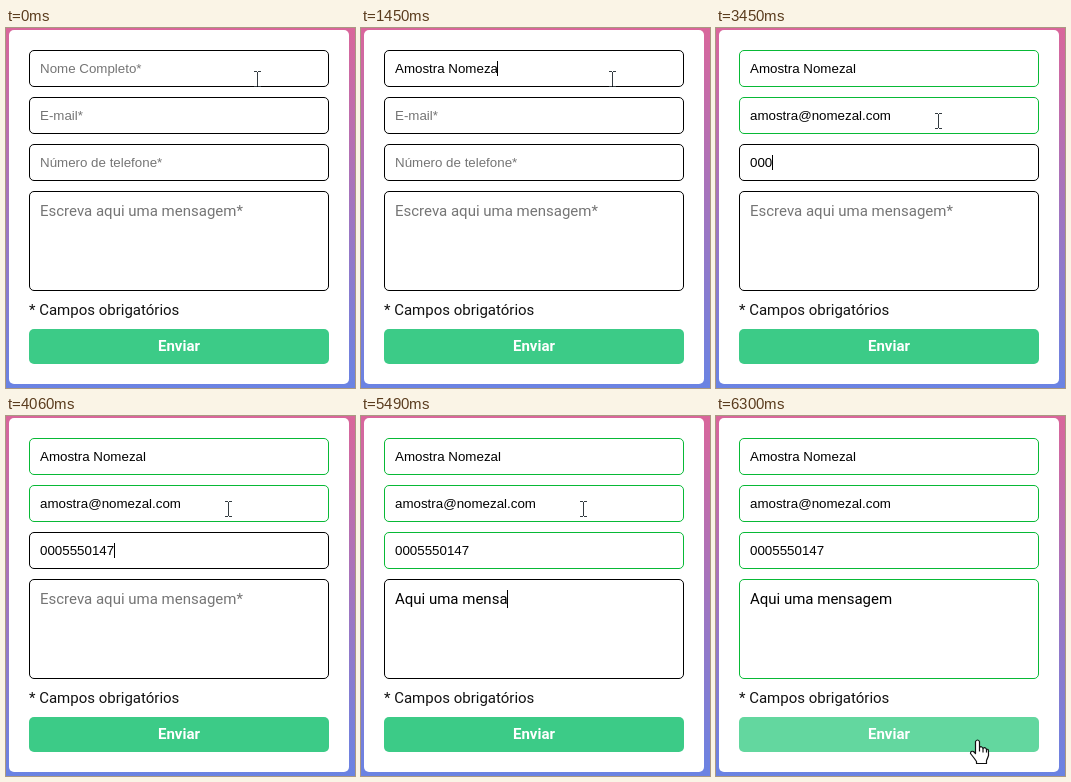
These frames come from a looping animation (349x360 px, 6430 ms). An HTML page:

```html
<!DOCTYPE html>
<html lang="pt">
<head>
<meta charset="utf-8">
<style>
html, body { margin: 0; width: 100%; height: 100%; overflow: hidden; }
svg { display: block; }
text { white-space: pre; font: 13.333px "Liberation Sans", Arial, sans-serif; }
.roboto { font: 15px Roboto, sans-serif; }
.bold { font-weight: 700; text-anchor: middle; }
</style>
</head>
<body>
<svg id="stage" width="349" height="360" viewBox="0 0 349 360">
  <defs>
    <linearGradient id="sky" x2="0" y2="1">
      <stop stop-color="#d9669b"/>
      <stop offset="1" stop-color="#6a83e3"/>
    </linearGradient>
  </defs>
  <rect width="349" height="360" fill="url(#sky)"/>
  <rect x="3" y="2" width="340" height="354" rx="5" fill="#fff"/>
  <g id="fields"></g>
  <text class="roboto" x="23" y="287" fill="#111">* Campos obrigatórios</text>
  <rect id="button" x="23" y="301" width="300" height="35" rx="5"/>
  <text class="roboto bold" x="173" y="323" fill="#fff">Enviar</text>
  <rect id="caret" width="1" fill="#000"/>
  <g id="beam" fill="none">
    <path d="M-3 -7.5H0M1 -7.5H4M.5 -7V7M-3 7.5H0M1 7.5H4" stroke="#fff" stroke-width="3"/>
    <path d="M-3 -7.5H0M1 -7.5H4M.5 -7V7M-3 7.5H0M1 7.5H4" stroke="#333b40"/>
  </g>
  <path id="hand" fill="#fff" stroke="#111" stroke-width="1.2" stroke-linejoin="round"
    d="M-2 1Q0 -2 2 1V7Q4 5 5.500 8Q8 6 9 9Q11 8 11 11V15Q10 18 9 20V23H-1V21Q-3 18 -7 13Q-7 10 -4 11L-2 13ZM2 7V11M5.500 8V12M9 9V12"/>
</svg>
<script>
const LOOP = 6430;
const $ = id => document.getElementById(id);
const run = (start, step, n) => Array.from({ length: n }, (_, i) => start + step * i);

// keys: the moment each character appears
const fields = [
  { y: 22, h: 37, hint: 'Nome Completo*', value: 'Amostra Nomezal', start: 0, end: 1710,
    keys: [...run(70, 640 / 7, 8), 910, 1110, 1180, 1250, 1320, 1450, 1580] },
  { y: 69, h: 37, hint: 'E-mail*', value: 'amostra@nomezal.com', start: 1710, end: 3260,
    keys: [1710, 1710, 1840, 1840, 2040, 2110, 2110, 2240, 2510, 2580, 2710, 2780,
      2980, 3050, 3050, 3120, 3190, 3190, 3190] },
  { y: 116, h: 37, hint: 'Número de telefone*', value: '0005550147', start: 3260, end: 4260,
    keys: [3260, 3380, 3450, ...run(3590, 470 / 6, 7)] },
  { y: 163, h: 100, hint: 'Escreva aqui uma mensagem*', value: 'Aqui uma mensagem', start: 4260, end: 6300,
    keys: [4260, 4330, 4460, 4460, 4730, 4730, 4800, 4870, 4870, 5020, 5090, 5220, 5290,
      5490, 5620, 5690, 5690] }
];
const caretOff = [[0, 70], [2440, 2510], [4660, 4730], [5890, LOOP]];
const moves = [5890, 5960, 6030, 6100, 6170, 6300];

function add(tag, attrs) {
  const el = document.createElementNS('http://www.w3.org/2000/svg', tag);
  for (const k in attrs) el.setAttribute(k, attrs[k]);
  return $('fields').appendChild(el);
}

for (const f of fields) {
  f.area = f.h > 40;
  f.box = add('rect', { x: 23.5, y: f.y + .5, width: 299, height: f.h - 1, rx: 4.5, fill: '#fff' });
  f.text = add('text', { x: 34, y: f.y + (f.area ? 25 : 23), class: f.area ? 'roboto' : '' });
}

function set(el, attrs) {
  for (const k in attrs) el.setAttribute(k, attrs[k]);
}

function pointer(t) {
  if (t < 1710) return [251, 51];
  const p = moves.filter(m => t >= m).length / moves.length;
  const e = p * p * (3 - 2 * p);
  return [222 + 39.5 * e, 93 + 231.5 * e];
}

function draw(t) {
  const blink = caretOff.some(([a, b]) => t >= a && t < b);
  for (const f of fields) {
    const n = f.keys.filter(k => t >= k).length;
    f.box.setAttribute('stroke', t >= f.end ? '#08b936' : '#000');
    f.text.setAttribute('fill', n ? '#000' : '#757575');
    f.text.textContent = n ? f.value.slice(0, n) : f.hint;
    if (t >= f.start && t < f.end) {
      set($('caret'), {
        x: 34 + Math.floor(n ? f.text.getComputedTextLength() : 0),
        y: f.y + 11,
        height: f.area ? 18 : 15
      });
    }
  }
  $('caret').style.display = blink ? 'none' : '';

  const [x, y] = pointer(t);
  const hover = y > 301;
  $('button').setAttribute('fill', hover ? '#63d79f' : '#3ccb87');
  $('beam').style.display = hover ? 'none' : '';
  $('hand').style.display = hover ? '' : 'none';
  const place = hover ? [x, y] : [Math.round(x), Math.round(y)];
  $(hover ? 'hand' : 'beam').setAttribute('transform', `translate(${place})`);
}

const begin = performance.now();
function frame() {
  draw((performance.now() - begin) % LOOP);
  requestAnimationFrame(frame);
}
frame();
</script>
</body>
</html>
```
